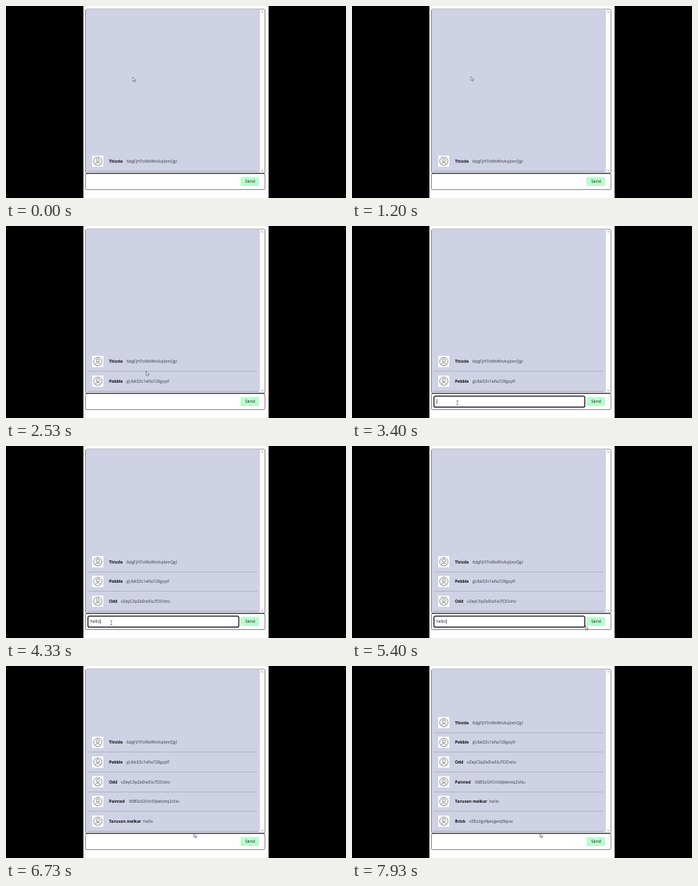
Animation, 426 px wide and 240 px high, one loop 8 s. Source, as an HTML page with a canvas:

```html
<!DOCTYPE html>
<html lang="en">
<head>
<meta charset="utf-8">
<title>Live chat</title>
<style>
  html, body { margin: 0; width: 100%; height: 100%; overflow: hidden; background: #000; }
  canvas { display: block; width: 426px; height: 240px; }
</style>
</head>
<body>
<canvas id="stage" width="426" height="240"></canvas>
<script>
const ctx = document.getElementById('stage').getContext('2d');
const LOOP = 8000, ROW = 24.65, LAST_ROW_Y = 194;
const FOCUS = 3250, TYPE_START = 3500, KEY_GAP = 150, SEND = 5950;
const FONT = '"Open Sans", "Noto Sans", sans-serif';
const DRAFT = 'hello';

// at: arrival time, x: left edge of the message text
const messages = [
  { at: 0,    name: 'Thistle', x: 151, text: '6dgFjH7oWxWnAojbmQgl' },
  { at: 1650, name: 'Pebble', x: 151, text: 'gUbkS3c1efia728gzyiF' },
  { at: 3650, name: 'Odd', x: 144, text: 'vZeyC0pZeDwSIuTDOohz' },
  { at: 5650, name: 'Painted', x: 154, text: 'X6BSzGVUnSbJebmq2cNu' },
  { at: SEND, name: 'Taruvan melkar', x: 172, text: DRAFT },
  { at: 7650, name: 'Brisk', x: 147, text: 's0Eo3gz9jeogeiq5bysv' }
];

// time, x, y of the pointer tip
const pointerPath = [
  [0, 159, 89], [900, 149, 88], [1500, 149, 88], [2530, 175.5, 181.5],
  [3150, 132, 221], [4800, 132, 221], [5400, 292.5, 224.5],
  [5750, 304, 221], [6050, 304, 221], [6600, 235.5, 209], [LOOP, 235.5, 209]
];

function box(x, y, w, h, radius, fill, stroke, line = 1) {
  ctx.beginPath();
  ctx.roundRect(x, y, w, h, radius);
  if (fill) { ctx.fillStyle = fill; ctx.fill(); }
  if (stroke) { ctx.strokeStyle = stroke; ctx.lineWidth = line; ctx.stroke(); }
}

function label(text, x, y, color, weight = 400, size = 5.25) {
  ctx.font = `${weight} ${size}px ${FONT}`;
  ctx.textBaseline = 'alphabetic';
  ctx.fillStyle = color;
  ctx.fillText(text, x, y + 1.9);
}

function triangle(x, y, dir) {
  ctx.fillStyle = '#888';
  ctx.beginPath();
  ctx.moveTo(x - 1.3, y + dir);
  ctx.lineTo(x + 1.3, y + dir);
  ctx.lineTo(x, y - dir);
  ctx.fill();
}

function avatar(x, y) {
  box(x - 7, y - 7, 14, 14, 0, '#fff');
  ctx.strokeStyle = '#666';
  ctx.lineWidth = 0.7;
  ctx.beginPath();
  ctx.arc(x, y, 5.2, 0, Math.PI * 2);
  ctx.moveTo(x + 2, y - 1.4);
  ctx.arc(x, y - 1.4, 2, 0, Math.PI * 2);
  ctx.moveTo(x - 3.4, y + 3.8);
  ctx.quadraticCurveTo(x, y - 1.2, x + 3.4, y + 3.8);
  ctx.stroke();
}

function messageRow({ name, x, text }, y) {
  avatar(115, y);
  label(name, 129, y, '#111', 700, 5.15);
  label(text, x, y, '#3c3c44');
  ctx.fillStyle = '#b0b1bd';
  ctx.fillRect(102, Math.floor(y + 12.5), 213, 0.8);
}

function inputBar(t) {
  box(99.5, 209.5, 225, 20, 1.5, '#fff', '#888', 0.9);
  ctx.fillStyle = '#333';
  ctx.fillRect(100, 208.8, 224, 1);
  if (t >= FOCUS && t < SEND) {
    box(102.7, 212.6, 189, 13.8, 2, '#fff', '#17172c', 1.2);
    const typed = Math.max(0, Math.min(DRAFT.length, Math.floor((t - TYPE_START) / KEY_GAP) + 1));
    const draft = DRAFT.slice(0, typed);
    label(draft, 105.5, 219.5, '#222');
    const lastKey = typed ? TYPE_START + (typed - 1) * KEY_GAP : FOCUS;
    if ((t - lastKey) % 1060 < 530) {
      ctx.fillRect(105.8 + ctx.measureText(draft).width, 216.5, 0.7, 6);
    }
  }
  box(294, 214, 23, 11, 1, '#b8fccd');
  label('Send', 299.7, 219.5, '#222');
}

function pointerAt(t) {
  const i = pointerPath.findIndex(([time], n) => n > 0 && t <= time);
  const [t0, x0, y0] = pointerPath[i - 1], [t1, x1, y1] = pointerPath[i];
  const p = (t - t0) / (t1 - t0), ease = p * p * (3 - 2 * p);
  return [x0 + (x1 - x0) * ease, y0 + (y1 - y0) * ease];
}

function pointer(x, y) {
  ctx.save();
  ctx.translate(x, y);
  ctx.strokeStyle = '#555';
  ctx.lineWidth = 0.6;
  if (x > 102 && x < 292 && y > 212 && y < 227) {
    ctx.stroke(new Path2D('M-1.2-2.5H1.2M0-2.5V2.5M-1.2 2.5H1.2'));
  } else {
    const arrow = new Path2D('M0 0V5L1.2 4L2 6L3 5.5L2.2 3.7H3.7Z');
    ctx.fillStyle = '#fff';
    ctx.fill(arrow);
    ctx.stroke(arrow);
  }
  ctx.restore();
}

function draw(t) {
  ctx.fillStyle = '#000';
  ctx.fillRect(0, 0, 426, 240);
  ctx.fillStyle = '#fdfdfd';
  ctx.fillRect(97, 0, 232, 240);

  box(99.5, 4, 225, 205, 2, '#fff', '#888', 0.9);
  ctx.fillStyle = '#cfd1e5';
  ctx.fillRect(100, 4.5, 218, 204);
  triangle(321, 7, 0.8);
  triangle(321, 206, -0.8);

  const shown = messages.filter(m => m.at <= t);
  shown.forEach((m, i) => messageRow(m, LAST_ROW_Y - (shown.length - 1 - i) * ROW));
  inputBar(t);
  pointer(...pointerAt(t));
}

const start = performance.now();
function frame() {
  draw((performance.now() - start) % LOOP);
  requestAnimationFrame(frame);
}
frame();
</script>
</body>
</html>
```
